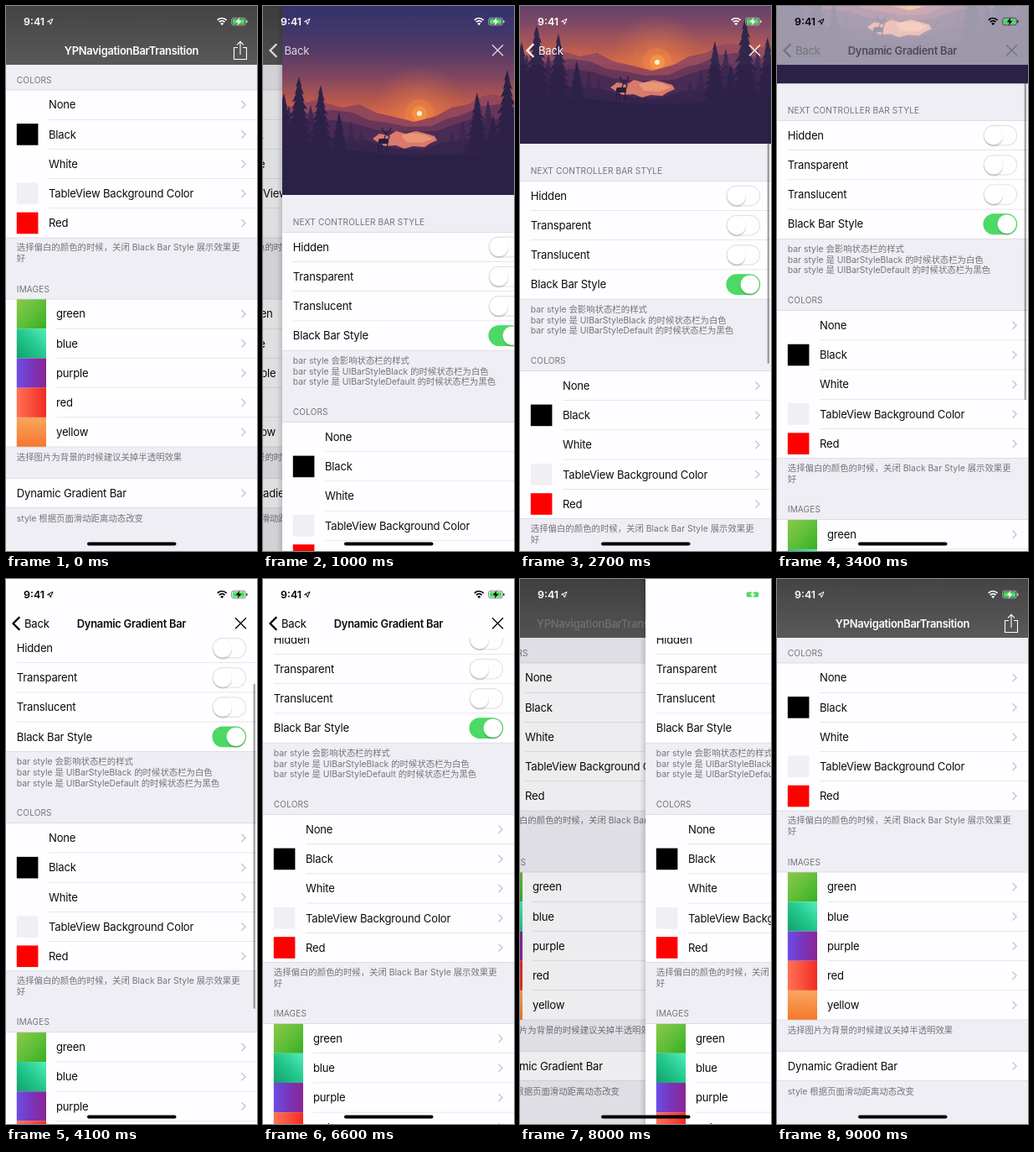
Write an HTML page that moves like this. It is 300 px wide and 649 px high and loops after 9100 ms.

```html
<!DOCTYPE html>
<html lang="zh-CN">
<head>
<meta charset="utf-8">
<style>
  html, body { margin: 0; width: 100%; height: 100%; overflow: hidden; background: #fff; }
  svg { display: block; }
  text { font: 13.1px Inter, "Noto Sans CJK SC", "Noto Sans CJK", sans-serif; letter-spacing: -.2px; white-space: pre; fill: #0c0c0c; }
  text.small { font-size: 10.4px; letter-spacing: 0; fill: #757479; }
  text.caption { font-size: 10.1px; letter-spacing: .12px; fill: #757479; }
  text.title { font-size: 12.9px; font-weight: 600; letter-spacing: -.27px; text-anchor: middle; }
  text.clock { font-size: 12.4px; font-weight: 600; letter-spacing: 0; }
  text.tinted { fill: currentColor; }
  .line { fill: none; stroke: currentColor; }
</style>
</head>
<body>
<svg id="stage" width="300" height="649" viewBox="0 0 300 649"></svg>
<script>
const ROW = 35.2, MARGIN = 12.8, HOME_OFFSET = 395.5, LOOP = 9100;
const PAPER = '#fefdff', TABLE = '#efeef4';

const rect = (x, y, w, h, fill, more = '') =>
  `<rect x="${x}" y="${y}" width="${w}" height="${h}" fill="${fill}" ${more}/>`;
const circle = (x, y, r, fill, more = '') => `<circle cx="${x}" cy="${y}" r="${r}" fill="${fill}" ${more}/>`;
const text = (x, y, str, cls = '') => `<text x="${x}" y="${y}" dy=".36em" class="${cls}">${str}</text>`;
const path = (d, more) => `<path d="${d}" ${more}/>`;
const shape = (d, fill) => path(d, `fill="${fill}"`);
const gradient = (id, [x1, y1, x2, y2], ...colors) =>
  `<linearGradient id="${id}" x1="${x1}" y1="${y1}" x2="${x2}" y2="${y2}">` +
  colors.map((c, i) => `<stop offset="${i / (colors.length - 1)}" stop-color="${c}"/>`).join('') +
  '</linearGradient>';

// Table view
const chevron = y => path(`M281.5 ${y - 4.6}l4.6 4.6l-4.6 4.6`, 'fill="none" stroke="#c7c7cc" stroke-width="1.4"');
const toggle = (y, on) => {
  const x = on ? 274.8 : 258.8;
  return rect(247, y - 11.8, 39.6, 23.6, on ? '#4cd964' : PAPER, `rx="11.8" stroke="${on ? '#4cd964' : '#e3e3e5'}" stroke-width="1.2"`) +
    circle(x, y + 2.2, 11.2, '#000', 'opacity=".14"') +
    circle(x, y, 11.2, '#fff', 'stroke="#000" stroke-opacity=".08" stroke-width=".5"');
};

function group(top, indent, labels, decorate) {
  const height = labels.length * ROW;
  let out = rect(0, top, 300, height, PAPER);
  labels.forEach((label, i) => {
    const y = top + (i + .5) * ROW;
    out += text(indent, y, label) + decorate(y, label, i);
    if (i) out += rect(indent, top + i * ROW - .4, 300 - indent, .6, '#d8d7db');
  });
  return out + rect(0, top - .4, 300, .6, '#cfced4') + rect(0, top + height - .4, 300, .6, '#cfced4');
}

const swatches = { Black: '#000', 'TableView Background Color': '#efeff4', Red: '#f00' };
const list =
  text(MARGIN, 257, 'NEXT CONTROLLER BAR STYLE', 'caption') +
  group(269.4, MARGIN, ['Hidden', 'Transparent', 'Translucent', 'Black Bar Style'], (y, label, i) => toggle(y, i === 3)) +
  text(MARGIN, 422, 'bar style 会影响状态栏的样式', 'small') +
  text(MARGIN, 434.8, 'bar style 是 UIBarStyleBlack 的时候状态栏为白色', 'small') +
  text(MARGIN, 447.6, 'bar style 是 UIBarStyleDefault 的时候状态栏为黑色', 'small') +
  text(MARGIN, 483.5, 'COLORS', 'caption') +
  group(495.6, 51, ['None', 'Black', 'White', 'TableView Background Color', 'Red'], (y, label) =>
    chevron(y) + (swatches[label] ? rect(MARGIN, y - 12.8, 25.6, 25.6, swatches[label]) : '')) +
  text(MARGIN, 683, '选择偏白的颜色的时候，关闭 Black Bar Style 展示效果更', 'small') +
  text(MARGIN, 695.8, '好', 'small') +
  text(MARGIN, 732.5, 'IMAGES', 'caption') +
  group(744.6, 60, ['green', 'blue', 'purple', 'red', 'yellow'], (y, label) =>
    chevron(y) + rect(MARGIN, y - ROW / 2, ROW, ROW, `url(#${label})`)) +
  text(MARGIN, 932.5, '选择图片为背景的时候建议关掉半透明效果', 'small') +
  group(957.9, MARGIN, ['Dynamic Gradient Bar'], chevron) +
  text(MARGIN, 1005.8, 'style 根据页面滑动距离动态改变', 'small');

// Sunset header
function pine(x, top, base, half, fill) {
  const tiers = 10, left = [], right = [];
  for (let i = 1; i <= tiers; i++) {
    const y = top + (base - top) * i / tiers;
    const w = half * (.08 + .92 * i / tiers), skew = i % 2 ? 1 : .84;
    left.push(`${x - w * skew} ${y}`, `${x - w * .5} ${y - 1.5}`);
    right.unshift(`${x + w * .5} ${y - 1.5}`, `${x + w * (1.84 - skew)} ${y}`);
  }
  return shape(`M${x} ${top - 4}L${left.join('L')}L${right.join('L')}Z`, fill);
}
const farPines = [[8, 122, 172, 15], [34, 122, 172, 15], [82, 142, 172, 9], [94, 150, 174, 7], [216, 140, 172, 10], [246, 116, 172, 15], [284, 116, 172, 15], [203, 152, 174, 7]];
const nearPines = [[20, 88, 176, 23], [46, 98, 176, 19], [2, 108, 178, 19], [68, 130, 178, 14], [269, 80, 176, 23], [233, 107, 176, 18], [296, 102, 178, 19], [252, 134, 178, 14]];
const scene =
  '<svg width="300" height="225">' + rect(0, 0, 300, 225, 'url(#sky)') +
  circle(164, 128, 58, 'url(#glow)') +
  circle(164, 128, 17, '#f2883f', 'opacity=".4"') + circle(164, 128, 9, '#fb9c45', 'opacity=".6"') +
  shape('M0 122L40 112L72 121L92 117L112 127L134 132L158 138L184 131L202 121L222 117L240 107L254 105L272 113L300 108V225H0Z', '#94475a') +
  circle(164, 128, 3, '#fff3d8') +
  shape('M0 130L60 124L84 127L104 136L126 139L150 144L178 143L198 134L214 130L236 120L258 117L300 126V225H0Z', '#683659') +
  shape('M0 138L62 136L88 140L110 147L140 150L184 149L206 141L232 133L300 138V225H0Z', '#492b54') +
  shape('M108 158L116 152L128 154L136 149L148 152L160 149L172 152L182 155L185 160L176 164L170 168L156 167L146 170L136 166L122 167Z', '#d97a6c') +
  shape('M142 154L154 151L170 153L180 158L166 163L148 162Z', '#ea9676') +
  farPines.map(p => pine(...p, '#3b2750')).join('') +
  shape('M0 158L70 158L100 160Q118 166 138 170L168 171L190 163L230 158H300V225H0Z', 'url(#ground)') +
  nearPines.map(p => pine(...p, '#2d2148')).join('') +
  shape('M0 172Q70 168 130 177Q200 180 300 170V225H0Z', '#2b2147') +
  path('M115 174L116 160L122 158L124 152L121 149L119 145M124 152L128 149L130 145M124 153L128 155L126 161L125 174M119 161L119 174', 'fill="none" stroke="#281d40" stroke-width="1.3"') +
  rect(115, 158, 12, 6, '#281d40', 'rx="2"') + '</svg>';

const statusBar =
  text(21, 18.5, '9:41', 'clock tinted') +
  path('M49.5 18.6L56 15.3L53.2 22L52.5 18.9Z', 'class="line" stroke-width="1"') +
  path('M252.8 16.8a7.5 7.5 0 0 1 10.8 0M254.9 19.1a4.6 4.6 0 0 1 6.6 0', 'class="line" stroke-width="1.7"') +
  shape('M258.2 23l-2-2.1a2.8 2.8 0 0 1 4 0Z', 'currentColor') +
  rect(269.6, 14.2, 16.8, 8.6, 'none', 'rx="2.4" stroke="currentColor" stroke-width=".8" stroke-opacity=".6"') +
  rect(270.9, 15.5, 14.2, 6, '#4cd964', 'rx="1.2"') +
  rect(287.3, 17, 1.1, 3, 'currentColor', 'rx=".5"') +
  shape('M279.4 13.6L274.8 19.2H277.8L276.6 23.4L281.4 17.7H278.4Z', 'currentColor');

const stage = document.getElementById('stage');
stage.innerHTML = '<defs>' +
  gradient('green', [0, 0, 1, 1], '#8cc84a', '#62bf3a', '#35b024') +
  gradient('blue', [0, 1, 1, 0], '#12a06c', '#22c78c', '#54edbb') +
  gradient('purple', [0, 0, 1, 0], '#6b4ee6', '#7a35bb', '#8b2596') +
  gradient('red', [0, 0, 1, 0], '#ff7256', '#f9503c', '#f02c22') +
  gradient('yellow', [0, 0, 0, 1], '#f9a560', '#f88f46', '#f5772c') +
  gradient('sky', [0, 0, 0, .62], '#33336a', '#40376a', '#573b66', '#7f4660', '#b5574e', '#e4703f') +
  gradient('ground', [0, 0, 0, 1], '#38264f', '#2b2147') +
  gradient('bar', [0, 0, 0, 1], '#444', '#595959') +
  gradient('edge', [0, 0, 1, 0], '#0000', '#0002') +
  '<radialGradient id="glow"><stop stop-color="#f78a45" stop-opacity=".6"/><stop offset="1" stop-color="#e8703f" stop-opacity="0"/></radialGradient>' +
  `<g id="list">${list}</g></defs>` +
  '<g id="home">' + rect(0, 0, 300, 649, TABLE) +
    `<use href="#list" y="${-HOME_OFFSET}"/>` +
    rect(0, 562.4, 300, ROW, '#000', 'id="press"') + rect(0, 0, 300, 70, 'url(#bar)') + '</g>' +
  rect(0, 0, 300, 649, '#000', 'id="dim"') +
  '<g id="page">' + rect(-7, 0, 7, 649, 'url(#edge)') + rect(0, 0, 300, 649, TABLE) +
    '<g id="content"><use href="#list"/>' + rect(295.6, 0, 2.4, 387, '#000', 'id="scroller" rx="1.2"') + scene + '</g>' +
    rect(0, 0, 300, 70, PAPER, 'id="pageBar"') + '</g>' +
  `<g id="homeTitle" color="#fff">${text(150, 53, 'YPNavigationBarTransition', 'title tinted')}</g>` +
  '<g id="share">' + path('M277 49.5H272.5V63.5H287.5V49.5H283M280 58V42.5M276 46.3L280 42.3L284 46.3', 'fill="none" stroke="#fff" stroke-width="1.1"') + '</g>' +
  '<g id="back">' + path('M16.3 45.2L8.6 53L16.3 60.8', 'class="line" stroke-width="2.3"') +
    `<g id="backLabel">${text(22, 53, 'Back', 'tinted')}</g></g>` +
  `<g id="pageTitle">${text(150, 53, 'Dynamic Gradient Bar', 'title')}</g>` +
  '<g id="close">' + path('M274 46.3L287 59.3M287 46.3L274 59.3', 'class="line" stroke-width="1.3"') + '</g>' +
  `<g id="status">${statusBar}</g>` + rect(97, 638.6, 106.5, 4, '#000', 'rx="2"');

const el = {};
stage.querySelectorAll('[id]').forEach(node => el[node.id] = node);

const clamp = v => Math.min(1, Math.max(0, v));
function track(t, keys) {
  const i = keys.findIndex(k => k[0] > t);
  if (i < 0) return keys[keys.length - 1][1];
  if (!i) return keys[0][1];
  const [t0, a] = keys[i - 1], [t1, b] = keys[i];
  return a + (b - a) * (t - t0) / (t1 - t0);
}
const slideKeys = [
  [500, 300], [600, 235], [700, 152], [800, 88], [900, 47], [1000, 23], [1100, 9], [1200, 3], [1300, 0],
  [6600, 0], [7300, 61], [8000, 150], [8200, 210], [8400, 282], [8500, 300]
];
const scrollKeys = [[2200, 0], [2700, 61], [4200, 215]];
const pressKeys = [[399, 0], [400, .15], [600, .15], [1000, 0]];
const scrollerKeys = [[2200, 0], [2300, .35], [4200, .35], [4600, 0]];

const move = (node, x, y = 0) => node.setAttribute('transform', `translate(${x} ${y})`);
const fade = (node, value) => node.setAttribute('opacity', clamp(value));

function draw(t) {
  const x = track(t, slideKeys), p = x / 300, scroll = track(t, scrollKeys);
  const solid = clamp(scroll / 155) ** 4;
  const shade = Math.round(255 * (1 - solid)), tint = `rgb(${shade},${shade},${shade})`;

  move(el.home, -90 * (1 - p));
  fade(el.press, track(t, pressKeys));
  fade(el.dim, .13 * (1 - p));
  move(el.page, x);
  el.page.style.display = p < 1 ? '' : 'none';
  move(el.content, 0, -scroll);
  move(el.scroller, 0, 2.6 + scroll * 1.597);
  fade(el.scroller, track(t, scrollerKeys));
  fade(el.pageBar, solid);

  move(el.homeTitle, -100 * (1 - p));
  fade(el.homeTitle, (p - .4) / .6);
  fade(el.share, 2 * p - 1);
  fade(el.back, 1 - 2.7 * p);
  move(el.backLabel, 45 * p);
  move(el.pageTitle, 206 * p);
  fade(el.pageTitle, solid * (1 - 3.1 * p));
  fade(el.close, 1 - 2.3 * p);
  el.back.style.color = p > 0 ? '#fff' : tint;
  el.close.style.color = tint;
  el.status.style.color = solid > .5 && p === 0 ? '#000' : '#fff';
}

const start = performance.now();
function tick() {
  const t = (performance.now() - start) % LOOP;
  draw(Math.floor((t + 15) / 100) * 100);
  requestAnimationFrame(tick);
}
tick();
</script>
</body>
</html>
```
